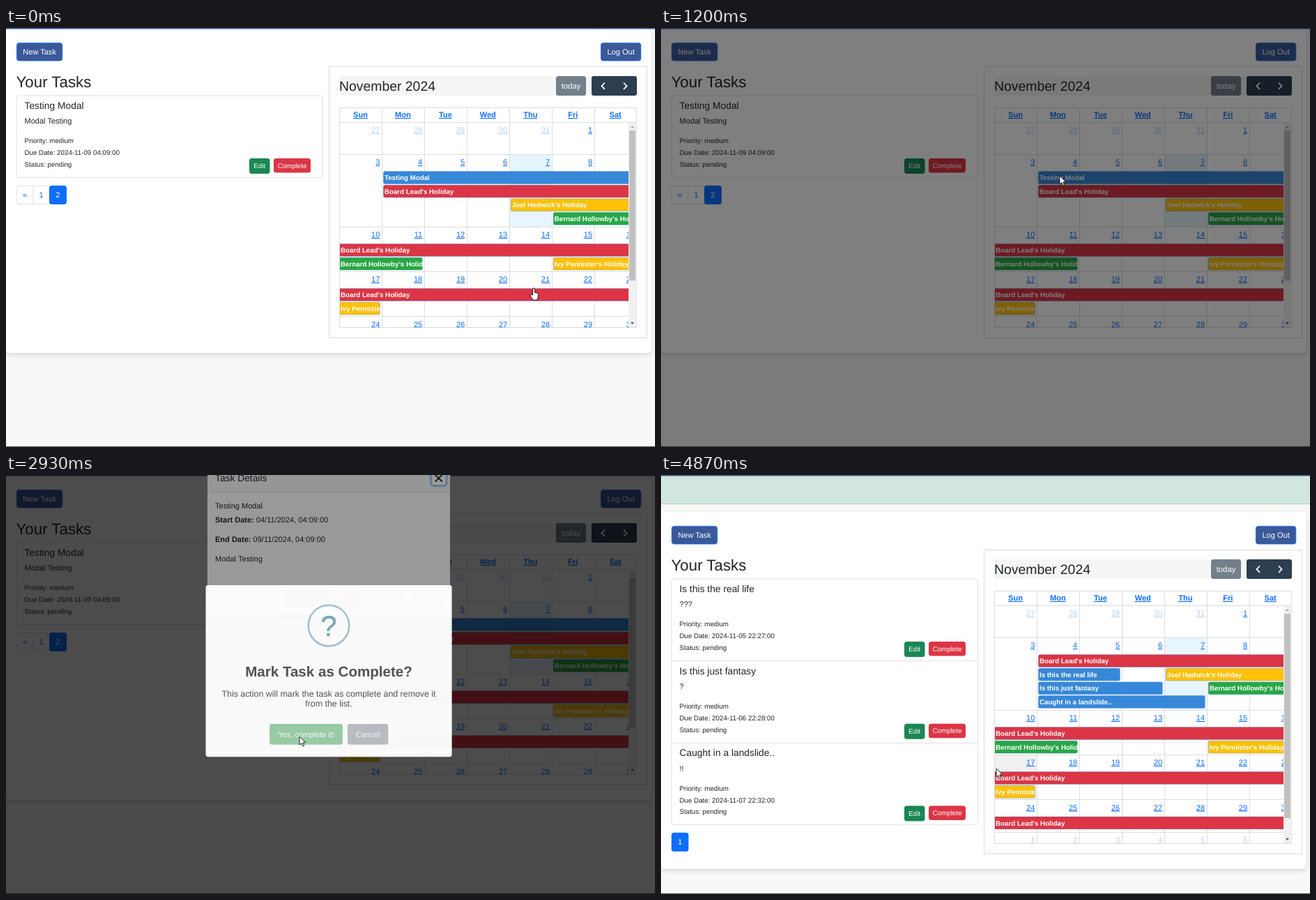
An HTML page that plays this animation: 931x601 px, repeating every 5.8 s.

```html
<!DOCTYPE html>
<html lang="en">
<head>
<meta charset="utf-8">
<title>Task calendar</title>
<style>
html, body { margin: 0; width: 100%; height: 100%; overflow: hidden; background: #f8f8f8; }
svg { display: block; font-family: "Liberation Sans", Arial, sans-serif; text-rendering: geometricPrecision; }
.b { font-weight: bold; }
.m { text-anchor: middle; }
.e { text-anchor: end; }
.u { text-decoration: underline; }
</style>
</head>
<body>
<script>
const BLUE = '#3788d8', RED = '#dc3545', YELLOW = '#ffc107', GREEN = '#28a745';
const LINK = '#0d6efd', INK = '#212529', LINE = '#ddd', NAVY = '#3b5998';

const rect = (x, y, w, h, fill, r = 0, extra = '') =>
  `<rect x="${x}" y="${y}" width="${w}" height="${h}" fill="${fill}" rx="${r}" ${extra}/>`;
const text = (x, y, size, str, fill = INK, cls = '', extra = '') =>
  `<text x="${x}" y="${y}" font-size="${size}" fill="${fill}" class="${cls}" ${extra}>${str}</text>`;
const path = (d, stroke, width = 1, fill = 'none') =>
  `<path d="${d}" stroke="${stroke}" stroke-width="${width}" fill="${fill}"/>`;
const button = (x, y, w, h, fill, str, size = 11.04, extra = '') =>
  rect(x, y, w, h, fill, 3.5, extra) + text(x + w / 2, y + h / 2 + size * .355, size, str, '#fff', 'm');
const group = (id, body) => `<g id="${id}">${body}</g>`;

// Calendar
const rows = [135, 181, 285, 349, 413.5, 460];
const colX = c => 478 + 60.95 * c;

// slot: line inside the week; from/to: columns, open ended where the event goes on
function event(row, slot, from, to, fill, name, starts = true) {
  const x = colX(from) + (starts ? 2 : 0), end = to > 6 ? 910 : colX(to) - 2;
  const w = end - x;
  return `<svg x="${x}" y="${rows[row] + 24.2 + slot * 19.6}" width="${w}" height="18.8">` +
    rect(starts ? .4 : -4, .4, w - (starts ? .8 : -3.4), 18, fill, 2.5,
      `stroke="${BLUE}" stroke-width=".7" stroke-opacity=".7"`) +
    text(2, 12.9, 9.75, name, '#fff', 'b') + '</svg>';
}

const board = "Board Lead's Holiday", joel = "Joel Hadwick's Holiday";
const bernard = "Bernard Hollowby's Holiday", ivy = "Ivy Pennister's Holiday";

const laterEvents = event(2, 0, 0, 7, RED, board, false) + event(2, 1, 0, 2, GREEN, bernard, false) +
  event(2, 1, 5, 7, YELLOW, ivy) + event(3, 0, 0, 7, RED, board, false) +
  event(3, 1, 0, 1, YELLOW, ivy, false) + event(4, 0, 0, 7, RED, board, false);

function calendar(bottom, events, shadeId, shadeRow, shadeCol) {
  let s = rect(463.5, 55.5, 456, bottom - 41, '#fff', 0, `stroke="${LINE}"`) +
    rect(478, 69, 427, 28, '#f5f5f5') + text(478, 90, 19.4, 'November 2024') +
    button(789, 69, 43, 28, '#737f8b', 'today', 11.3) + rect(840, 69, 65, 28, '#2c3e50', 3) +
    path('M859 78.5l-4.5 4.7 4.5 4.7M886 78.5l4.5 4.7-4.5 4.7', '#fff', 1.8) +
    rect(478.5, 114.5, 426, bottom - 115, '#fff', 0, `stroke="${LINE}"`);
  'Sun Mon Tue Wed Thu Fri Sat'.split(' ').forEach((d, c) =>
    s += text(colX(c + .5), 128, 11.04, d, LINK, 'b m u'));
  for (let c = 1; c < 7; c++) s += path(`M${Math.round(colX(c)) + .5} 115V135`, LINE);

  let body = rect(colX(4), 181, 61, 104, '#e6f5fe') +
    rect(colX(shadeCol), rows[shadeRow], 61, rows[shadeRow + 1] - rows[shadeRow], '#000', 0,
      `id="${shadeId}" fill-opacity=".06"`);
  for (let c = 1; c < 7; c++) body += path(`M${Math.round(colX(c)) + .5} 135V480`, LINE);
  rows.forEach((y, r) => {
    body += path(`M478 ${Math.floor(y) + .5}H905`, LINE);
    for (let c = 0; c < 7; c++) {
      const n = r * 7 + c - 4, outside = n < 1 || n > 30;
      body += text(colX(c) + 58.3, y + 15, 11.04, n < 1 ? n + 31 : n > 30 ? n - 30 : n, LINK, 'e u',
        outside ? 'opacity=".3"' : '');
    }
  });
  s += `<svg width="893" height="${bottom - .5}">${body}${events}${laterEvents}</svg>`;

  const view = bottom - 136, thumb = view * (view - 24) / 368.6;
  return s + path(`M478 135.5H905M478.5 115V${bottom}`, LINE) +
    rect(893, 136, 11.5, view - 1, '#f1f1f1') + rect(894, 147, 9, thumb, '#c1c1c1') +
    path('M896 143.2l2.5-3 2.5 3z', 'none', 0, '#a3a3a3') +
    path(`M896 ${bottom - 8}l2.5 3 2.5-3z`, 'none', 0, '#505050');
}

// Task list
function task(i, [title, note, due], hoverId = '') {
  const y = 97 + 117.7 * i;
  return (i ? path(`M15 ${y}H454`, '#dee2e6') : '') +
    text(26.5, y + 19, 13.8, title) + text(26.5, y + 40.3, 11.04, note) +
    ['Priority: medium', 'Due Date: ' + due, 'Status: pending'].map((line, k) =>
      text(26.5, y + 68.2 + 16.9 * k, 9.75, line)).join('') +
    button(349, y + 90, 29.5, 22, '#198754', 'Edit', 9.75) +
    button(384, y + 90, 53, 20.5, RED, 'Complete', 9.75, hoverId && `id="${hoverId}"`);
}

function page(id, dy, bottom, tasks, pager, cal) {
  const outline = `stroke="${LINK}" stroke-width=".8"`;
  return `<g id="${id}">` + rect(0, 0, 931, 601, '#f8f8f8') + `<g transform="translate(0 ${dy})">` +
    rect(0, 1, 925.5, bottom + 35, '#fff', 6, 'filter="url(#shadow)"') +
    button(15.4, 21.4, 65.4, 25.6, NAVY, 'New Task', 11.04, outline) +
    button(853.4, 21.4, 57.4, 25.6, NAVY, 'Log Out', 11.04, outline) +
    text(14.5, 85.3, 22.3, 'Your Tasks') +
    rect(15, 97, 439.5, 117.6 * tasks.length, '#fff', 4, 'stroke="#dee2e6"') +
    tasks.map((t, i) => task(i, t, i == 1 ? 'rowDone' : '')).join('') + pager + cal + '</g>' +
    (dy ? rect(0, 1, 931, 41, '#d1e7dd') + path('M0 41.5H931', '#a9cfbd') : '') +
    rect(0, 0, 931, 1.5, NAVY) + rect(0, 600, 931, 1, '#555') + '</g>';
}

const before = page('before', 0, 430, [['Testing Modal', 'Modal Testing', '2024-11-09 04:09:00']],
  rect(15, 226.5, 71, 26, '#fff', 4, 'stroke="#dee2e6"') + path('M38.8 227V253', '#dee2e6') +
  rect(62, 226, 25, 27, LINK, 4) + text(27, 243.3, 11.04, '«', LINK, 'm') +
  text(50.5, 243.3, 11.04, '1', LINK, 'm') + text(74.3, 243.3, 11.04, '2', '#fff', 'm'),
  calendar(430, event(1, 0, 1, 7, BLUE, 'Testing Modal') + event(1, 1, 1, 7, RED, board) +
    event(1, 2, 4, 7, YELLOW, joel) + event(1, 3, 5, 7, GREEN, bernard), 'shade4', 1, 1));

const songs = ['Is this the real life', 'Is this just fantasy', 'Caught in a landslide..'];
const after = page('after', 52, 477, [
  [songs[0], '???', '2024-11-05 22:27:00'],
  [songs[1], '?', '2024-11-06 22:28:00'],
  [songs[2], '!!', '2024-11-07 22:32:00']],
  button(15, 461, 24.5, 27, LINK, '1'),
  calendar(477, event(1, 0, 1, 7, RED, board) +
    songs.map((name, i) => event(1, i + 1, 1, i + 3, BLUE, name)).join('') +
    event(1, 1, 4, 7, YELLOW, joel) + event(1, 2, 5, 7, GREEN, bernard), 'shade17', 3, 0));

// Dialogs
const dated = (y, label, value) =>
  text(300, y, 11.04, `<tspan class="b">${label}</tspan> ${value}`);
const modal = group('modal',
  rect(289, -20, 348, 220, '#fff', 5) + rect(289, -20, 348, 45.5, '#f8f9fa', 5) +
  path('M289 25.5H637', '#e6e8ea') + text(300, 9, 13.8, 'Task Details') +
  rect(609.5, -7, 22.5, 22.5, '#fff', 4, 'id="ring" stroke="#a6c7fb" stroke-width="3"') +
  path('M615.7 -.3l10 10m0-10l-10 10', '#111', 1.7) +
  text(300, 47.5, 11.04, 'Testing Modal') + dated(67.7, 'Start Date:', '04/11/2024, 04:09:00') +
  dated(95.7, 'End Date:', '09/11/2024, 04:09:00') + text(300, 123.7, 11.04, 'Modal Testing') +
  button(399.5, 162.5, 63.5, 26.5, '#198754', 'Edit Task') +
  rect(469, 163, 105, 25.5, RED, 3.5, 'id="modalDone"') +
  rect(477, 169.5, 11.5, 11.5, '#fff', 2) + path('M479.5 175l2.4 2.6 4.2-5', RED, 1.5) +
  text(491, 179.3, 11.04, 'Complete Task', '#fff') +
  button(579, 162.5, 47, 26.5, '#6c757d', 'Close'));

const alertBox = group('alert',
  rect(286.3, 157.8, 353.5, 246.6, '#fff', 3.5) +
  group('icon', '<circle r="29.3" fill="none" stroke="#a5c4d0" stroke-width="2.6"/>' +
    group('mark', text(0, 15, 41.4, '?', '#7fa9bb', 'm', 'stroke="#7fa9bb" stroke-width=".6"'))) +
  text(463, 289.3, 20.6, 'Mark Task as Complete?', '#545454', 'b m') +
  text(463, 318.3, 12.42, 'This action will mark the task as complete and remove it', '#545454', 'm') +
  text(463, 332.5, 12.42, 'from the list.', '#545454', 'm') +
  group('choices', button(378, 357, 105, 30, GREEN, 'Yes, complete it!', 11.04, 'id="yes"') +
    button(490, 357, 58.5, 30, '#6c757d', 'Cancel')));

const cursors =
  group('arrow', path('M0 0V12.2L2.8 9.6 4.7 14 6.7 13.1 4.8 8.9H8.7Z', '#000', .8, '#fff')) +
  group('hand', path('M-1.4 10V1.4Q-1.4 0 0 0T1.4 1.4V6.2L5.2 7.2Q7 7.8 6.8 9.6L6 14 5 17.2H-1.2' +
    'Q-2.2 14.6 -4.6 11.6Q-5.4 9.6 -3.6 9.2Z', '#000', .9, '#fff'));

document.body.innerHTML = `<svg width="931" height="601" viewBox="0 0 931 601">
  <filter id="shadow"><feDropShadow dx="0" dy="3" stdDeviation="3" flood-opacity=".13"/></filter>
  ${before}${rect(0, 0, 931, 601, '#000', 0, 'id="dim"')}${modal}
  ${rect(0, 0, 931, 601, '#000', 0, 'id="alertDim"')}${alertBox}${after}${cursors}</svg>`;

// Motion
const $ = id => document.getElementById(id);
const set = (id, name, value) => $(id).setAttribute(name, value);
const show = (id, on) => set(id, 'visibility', on ? 'visible' : 'hidden');
const ramp = (t, start, length) => Math.min(1, Math.max(0, (t - start) / length));
const smooth = p => p * p * (3 - 2 * p);

function track(keys, t, ease = p => p) {
  let i = keys.length - 1;
  while (i > 0 && keys[i][0] > t) i--;
  const a = keys[i], b = keys[i + 1] || a;
  const p = b == a ? 0 : ease(ramp(t, a[0], b[0] - a[0]));
  return a.map((v, k) => v + (b[k] - v) * p);
}

// time, x, y of the pointer
const route = [[0, 757, 373], [130, 735, 350], [330, 612, 255], [467, 532, 190], [600, 576, 215],
  [730, 572, 212], [1400, 572, 212], [1800, 514, 173], [1933, 514, 173], [2400, 402, 370],
  [2660, 421, 375], [3867, 421, 375], [3933, 438, 376], [4067, 702, 240], [4200, 480, 130],
  [4333, 137, 230], [4467, 243, 409], [4667, 526, 426], [4867, 481, 421]];
const bounce = [[0, .7], [.45, 1.05], [.8, .95], [1, 1]];

function draw(t) {
  const done = t >= 3530;
  show('before', !done);
  show('after', done);
  show('shade4', !done && t >= 1060 && t < 1190);
  show('shade17', done && t >= 4590);

  set('dim', 'opacity', done ? 0 : .5 * ramp(t, 1020, 150));
  const opened = ramp(t, 1200, 300);
  set('modal', 'opacity', done ? 0 : opened);
  set('modal', 'transform', `translate(0 ${-35 * (1 - opened) ** 2})`);
  set('ring', 'stroke-opacity', t < 3260 ? 1 : 0);

  const closing = ramp(t, 2929, 150);
  const scale = track(bounce, ramp(t, 1857, 300), smooth)[1] * (1 - .5 * smooth(closing));
  set('alertDim', 'opacity', .4 * ramp(t, 1850, 100) * (1 - ramp(t, 2935, 100)));
  set('alert', 'opacity', t < 1857 ? 0 : 1 - closing);
  set('alert', 'transform', `translate(463 281) scale(${scale}) translate(-463 -281)`);
  set('choices', 'opacity', t < 2929 ? 1 : .45);
  const flip = smooth(ramp(t, 1857, 500));
  set('icon', 'opacity', flip);
  set('icon', 'transform', `translate(463 216) scale(1 ${Math.cos((1 - flip) * 1.745)})`);
  set('mark', 'transform', `scale(${Math.cos(2 * Math.PI * smooth(ramp(t, 1857, 800)))} 1)`);

  const [, x, y] = track(route, t);
  const over = (x0, y0, w, h) => x >= x0 && x <= x0 + w && y >= y0 && y <= y0 + h;
  set('yes', 'fill', over(378, 357, 105, 30) ? '#249640' : GREEN);
  set('modalDone', 'fill', over(469, 163, 105, 26) ? '#bb2d3b' : RED);
  set('rowDone', 'fill', done && t < 3990 ? '#bb2d3b' : RED);

  const pointing = t < 100 || t > 590 && t < 1060 || done && t < 3990;
  show('hand', pointing);
  show('arrow', !pointing);
  set(pointing ? 'hand' : 'arrow', 'transform', `translate(${x} ${y})`);
}

// The picture advances 15 times a second
function frame() {
  draw(Math.floor((performance.now() % 5800 + 3.5) * .015) / .015 % 5800);
  requestAnimationFrame(frame);
}
frame();
</script>
</body>
</html>
```
